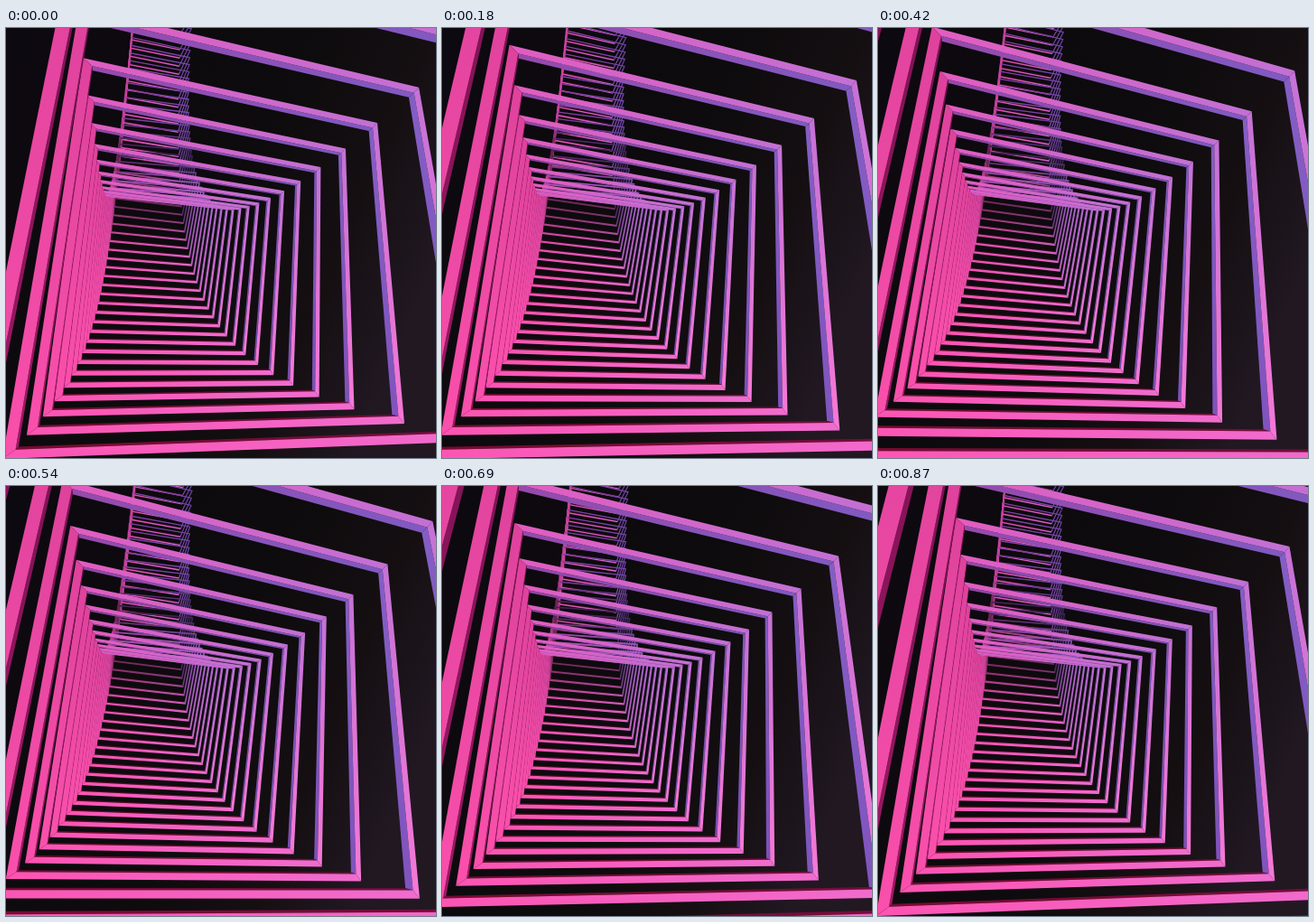
Recreate the animation shown at these times as an HTML page with a canvas. Size 476 px wide and 476 px high, loop 0.9 s.

```html
<!DOCTYPE html>
<html>
<head>
<meta charset="utf-8">
<style>
html, body { margin: 0; width: 100%; height: 100%; overflow: hidden; background: #0c0a0e; }
canvas { display: block; }
</style>
</head>
<body>
<canvas id="stage" width="476" height="476"></canvas>
<script>
const ctx = document.getElementById('stage').getContext('2d');
const SIZE = 476, LOOP = 900, STEP = 30;
const FIRST = -2, LAST = 47, BAR_DEPTH = 0.11;

// Each corner runs along origin + spread / z + bend * z, where z = depth + near.
const corners = [
  { near: 7.75, x: [105, -198, 0.8], y: [561, -3478, -10.2], swing: [-18, -8] },
  { near: 7.75, x: [78, 2487, 1.57], y: [502.7, -2537, -9.07], swing: [-13, 3] },
  { near: 4.8, x: [107.4, 1576, 1.1], y: [442, 188, -9], swing: [-26, 7] },
  { near: 4.8, x: [120, -480, 0.6], y: [428, 316, -9], swing: [-35, -8] }
];

// Bars in order top, right, bottom, left; colours at both ends.
const bars = [
  { width: 0.8, cool: 0.6, front: [[226, 92, 192], [194, 112, 212]], inside: [[150, 74, 172], [128, 90, 194]] },
  { width: 0.7, cool: 0.6, front: [[196, 114, 214], [246, 120, 214]], inside: [[132, 94, 196], [128, 84, 190]] },
  { width: 1, cool: 0.15, front: [[240, 108, 206], [252, 84, 178]], inside: [[120, 12, 60], [120, 10, 48]] },
  { width: 1.3, cool: 0.15, front: [[250, 80, 172], [222, 66, 156]], inside: [[160, 24, 100], [124, 18, 84]] }
];
const BLUE = [66, 46, 150];

const rail = ([origin, spread, bend], z) => origin + spread / z + bend * z;
const wave = turns => Math.cos(2 * Math.PI * turns);
const mix = (a, b, s) => a + (b - a) * s;
const clamp = v => Math.min(1, Math.max(0, v));

function cornersAt(depth, phase) {
  const p = corners.map(c => [rail(c.x, depth + c.near), rail(c.y, depth + c.near)]);
  // The sway reaches its peak earlier in the deeper part of the tunnel.
  const peak = 0.46 - 0.006 * depth;
  const sway = (wave(phase - peak) - wave(peak)) / 2;
  const amount = sway * (p[2][0] - p[3][0]) / 346;
  return p.map(([x, y], i) => [x + corners[i].swing[0] * amount, y + corners[i].swing[1] * amount]);
}

function toward(from, to) {
  const dx = to[0] - from[0], dy = to[1] - from[1], len = Math.hypot(dx, dy);
  return [dx / len, dy / len];
}

function inset(p) {
  const size = (p[1][0] - p[0][0] + p[2][0] - p[3][0] + p[2][1] - p[1][1] + p[3][1] - p[0][1]) / 4;
  const w = 0.5 + 0.021 * size;
  return p.map((corner, i) => {
    const before = (i + 3) % 4;
    const a = toward(corner, p[(i + 1) % 4]), b = toward(corner, p[before]);
    return corner.map((v, axis) => v + w * (a[axis] * bars[before].width + b[axis] * bars[i].width));
  });
}

function drawRing(outer, inner, face, depth, light) {
  bars.forEach((bar, a) => {
    const b = (a + 1) % 4, cool = bar.cool * clamp((depth - 8) / 16);
    const fill = ctx.createLinearGradient(...outer[a], ...outer[b]);
    bar[face].forEach((color, stop) => {
      const tone = color.map((v, i) => Math.round(mix(v, BLUE[i], cool) * light));
      fill.addColorStop(stop, `rgb(${tone})`);
    });
    ctx.fillStyle = fill;
    ctx.beginPath();
    for (const p of [outer[a], outer[b], inner[b], inner[a]]) ctx.lineTo(...p);
    ctx.fill();
  });
}

const backdrop = ctx.createLinearGradient(0, 60, SIZE, 260);
backdrop.addColorStop(0, '#0d0910');
backdrop.addColorStop(0.55, '#0d0b0d');
backdrop.addColorStop(0.8, '#150f12');
backdrop.addColorStop(1, '#211822');

function draw(phase) {
  ctx.fillStyle = backdrop;
  ctx.fillRect(0, 0, SIZE, SIZE);
  for (let k = LAST; k >= FIRST; k--) {
    const depth = k - phase;
    const light = 1 - 0.5 * Math.exp(-(((depth - 23) / 3.5) ** 2));
    const outer = cornersAt(depth, phase), inner = inset(outer);
    const back = inset(cornersAt(depth + BAR_DEPTH, phase));
    drawRing(inner, back, 'inside', depth, light * (1 - 0.5 * clamp(depth / 20)));
    drawRing(outer, inner, 'front', depth, light);
  }
}

function tick() {
  draw(Math.floor(performance.now() / STEP) * STEP % LOOP / LOOP);
  requestAnimationFrame(tick);
}
tick();
</script>
</body>
</html>
```
